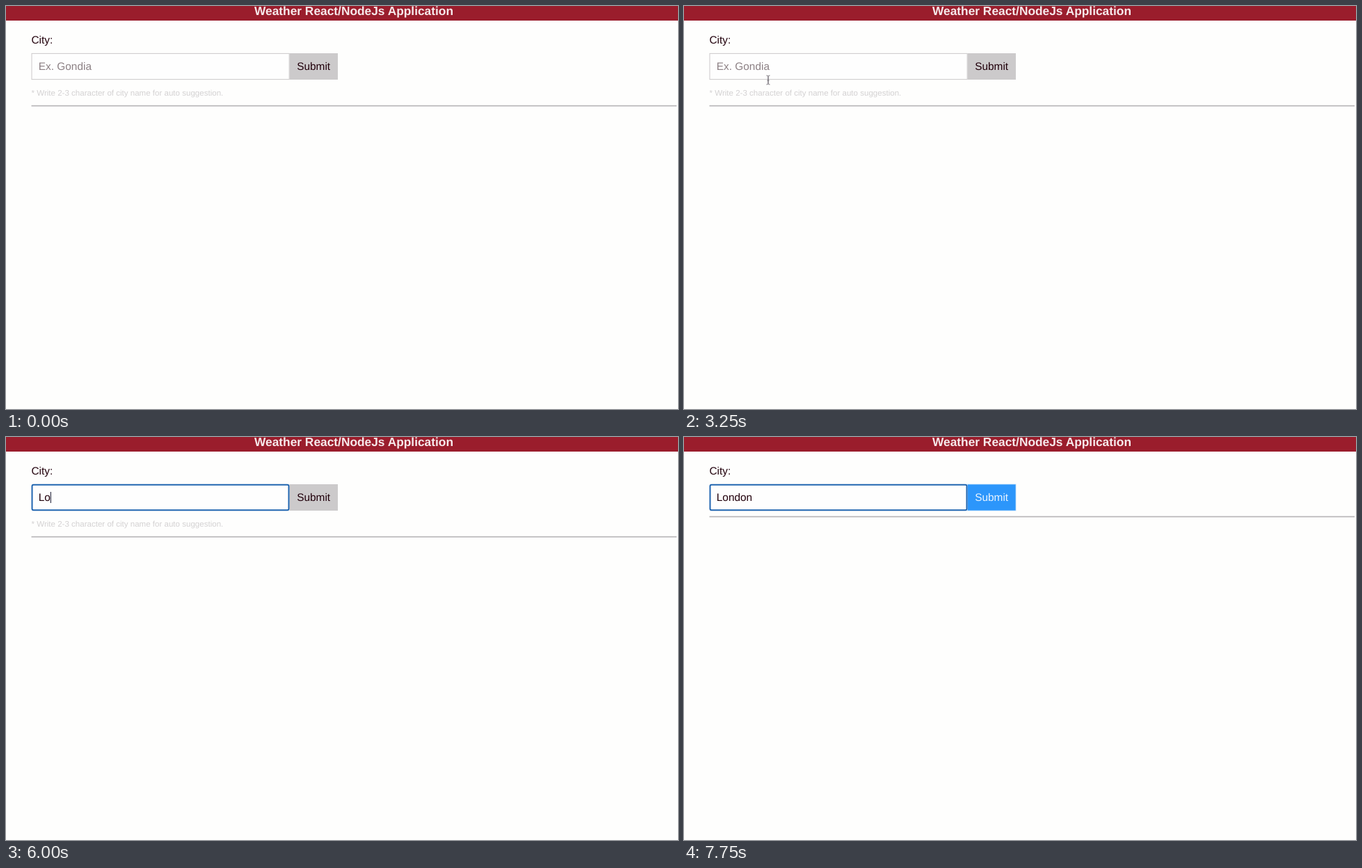
These frames come from a looping animation (966 by 580 pixels, 8000 ms). An HTML page:

```html
<!DOCTYPE html>
<html lang="en">
<head>
<meta charset="utf-8">
<title>Weather form</title>
<style>
  html, body { margin: 0; width: 100%; height: 100%; overflow: hidden; background: #fefefd; }
  svg { display: block; font: 15.4px "Liberation Sans", Arial, sans-serif; text-rendering: geometricPrecision; }
  text { white-space: pre; }
</style>
</head>
<body>
<svg width="966" height="580" viewBox="0 0 966 580" fill="#22000c">
  <rect width="966" height="21" fill="#9a1d2c"/>
  <text x="357" y="12.6" font-size="17.33" font-weight="bold" fill="#f6e9eb">Weather React/NodeJs Application</text>
  <text x="36.5" y="54">City:</text>

  <rect id="button" x="407.5" y="68" width="69.5" height="38"/>
  <text id="label" x="418.2" y="92">Submit</text>
  <rect id="field" fill="#fefefe"/>
  <text id="value" x="46.8" y="92"></text>
  <rect id="caret" y="79" width="1.1" height="16" fill="#26263c"/>

  <text id="hint" x="36.5" y="129" font-size="11.55" fill="#d3d1d2">* Write 2-3 character of city name for auto suggestion.</text>
  <rect id="rule" x="36.5" width="927.5" height="1.7" fill="#b9b7b9"/>

  <g id="arrow">
    <path d="M1 2v12l3-2.5 2 4.5 3-1-2-4.5h3z" fill="#888" opacity=".3"/>
    <path d="M0 0v11.5l2.6-2.3 2 4.3 2-.9-2-4.2h3.6z" stroke="#fff" stroke-width=".6"/>
  </g>
  <path id="beam" d="M118.5 100q2.5 0 2.5 1.5v10q0 1.5-2.5 1.5M123.5 100q-2.5 0-2.5 1.5v10q0 1.5 2.5 1.5M119.5 107h3"
        fill="none" stroke="#77737a" stroke-width="1"/>
</svg>
<script>
const LOOP = 8000, BLINK = 500;
const FOCUS = 3500, BEAM = 3250;
const KEYS = [5250, 6000, 6250, 6500, 7000, 7250];
const PATH = [[500, 100, 390], [750, 105.5, 355.5], [2750, 110, 329], [3000, 117, 190]];
const WORD = 'London', CHAR_WIDTH = 15.4 * .556;

const $ = id => document.getElementById(id);
const set = (id, attrs) => {
  for (const name in attrs) $(id).setAttribute(name, attrs[name]);
};
const show = (id, on) => set(id, { visibility: on ? 'visible' : 'hidden' });

function draw(t) {
  const typed = KEYS.filter(k => k <= t);
  const focused = t >= FOCUS;
  const ready = typed.length >= 3;

  set('field', focused
    ? { x: 37.5, y: 68.8, width: 369, height: 36.4, rx: 2, stroke: '#2065b0', 'stroke-width': 2 }
    : { x: 37, y: 68.4, width: 370.2, height: 37.2, rx: 0, stroke: '#cfcdce', 'stroke-width': 1.1 });
  set('value', { fill: typed.length ? '#22000c' : '#8c8084' });
  $('value').textContent = typed.length ? WORD.slice(0, typed.length) : 'Ex. Gondia';

  // The caret restarts its blink on focus and on every key.
  const since = t - (typed.at(-1) ?? FOCUS);
  set('caret', { x: 46.7 + typed.length * CHAR_WIDTH });
  show('caret', focused && since % (2 * BLINK) < BLINK);

  set('button', { fill: ready ? '#2c96fb' : '#cccacb', stroke: ready ? '#b5d9fb' : 'none', 'stroke-width': .8 });
  set('label', { fill: ready ? '#e9f4ff' : '#22000c' });
  show('hint', !ready);
  set('rule', { y: ready ? 113.8 : 142.8 });

  const stop = PATH.findLast(p => p[0] <= t);
  show('arrow', stop && t < BEAM);
  if (stop) set('arrow', { transform: `translate(${stop[1]} ${stop[2]})` });
  show('beam', t >= BEAM && !typed.length);
}

const start = performance.now();
function tick() {
  draw((performance.now() - start) % LOOP);
  requestAnimationFrame(tick);
}
tick();
</script>
</body>
</html>
```
